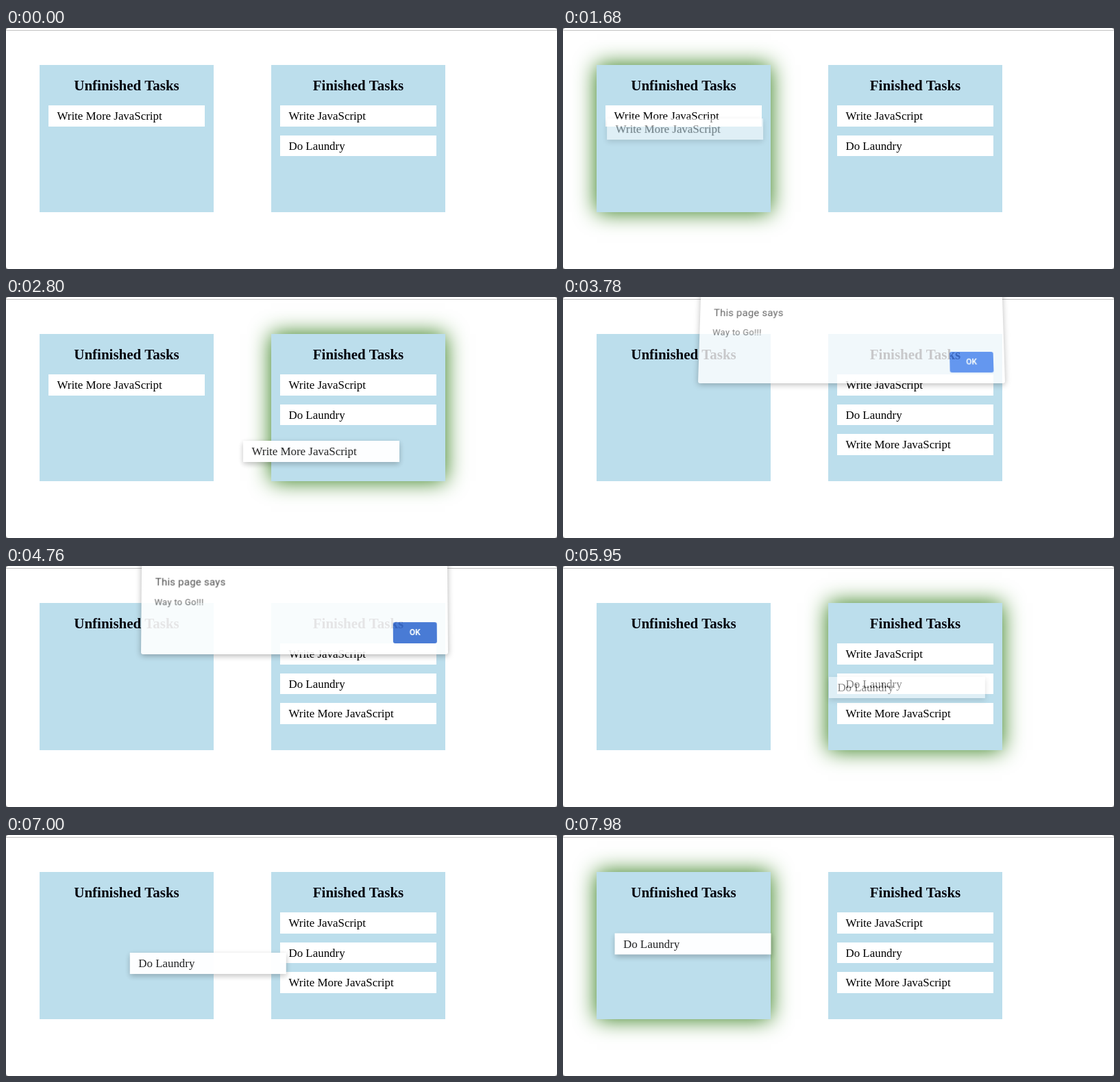
Animation, 804 px wide and 352 px high, one loop 8000 ms. Source, as an HTML page:

```html
<!DOCTYPE html>
<html lang="en">
<head>
<meta charset="utf-8">
<title>Task board</title>
<style>
  html, body { margin: 0; width: 100%; height: 100%; overflow: hidden; background: #8a8a8a; }
  .stage {
    position: relative; width: 804px; height: 352px; overflow: hidden;
    background: #fff; border-radius: 4px;
    font: 16.9px/32.5px "Liberation Serif", "Times New Roman", serif; color: #000;
  }
  .stage * { position: absolute; box-sizing: border-box; margin: 0; white-space: nowrap; }
  .rule { left: 0; top: 3px; width: 100%; height: 1px; background: #c3c3c3; }

  .list { top: 54px; width: 254px; height: 215px; background: #bcdeec; }
  .todo { left: 49px; }
  .done { left: 387px; }
  h2 { top: 18px; width: 100%; font-size: 21px; line-height: 24px; text-align: center; color: #02020c; }

  .task { left: 13px; width: 228px; height: 30.5px; padding-left: 12.5px; background: #fff; }
  .task span { position: static; }
  .row1 { top: 59px; }
  .row2 { top: 102.5px; }
  .row3 { top: 146px; }

  .glow { inset: 0; box-shadow: 0 0 30px rgb(42, 120, 16); opacity: 0; }
  .ghost { left: 0; top: 0; color: #1c1c1c; box-shadow: 0 3px 8px rgba(0, 0, 0, .25); opacity: 0; }

  .dialog {
    left: 197px; top: -14px; width: 448px; height: 144px; background: #fff;
    border-radius: 3px; box-shadow: 0 2px 8px rgba(0, 0, 0, .35);
    font-family: Roboto, sans-serif; transform-origin: 50% 100%; opacity: 0;
  }
  .says { left: 20px; top: 28px; font-size: 15px; line-height: 20px; letter-spacing: .25px; color: #3b3b3b; }
  .cheer { left: 19px; top: 58px; font-size: 13px; line-height: 20px; letter-spacing: .3px; color: #5c5c5c; }
  .ok {
    left: 368px; top: 97px; width: 64px; height: 31px; border-radius: 3px; background: #4a83f0;
    color: #fff; font-size: 12px; font-weight: 700; line-height: 31px; text-align: center;
  }

  /* one loop is 8 s, so 1% is 80 ms */
  .leave      { animation: leave 8s step-end infinite; }
  .arrive     { animation: arrive 8s step-end infinite; }
  .todo .glow { animation: todo-glow 8s step-end infinite; }
  .done .glow { animation: done-glow 8s step-end infinite; }
  .write      { animation: write-path 8s linear infinite, write-fade 8s linear infinite; }
  .wash       { animation: wash-path 8s linear infinite, wash-fade 8s linear infinite; }
  .dialog     { animation: dialog 8s linear infinite; }
  .ok         { animation: press 8s step-end infinite; }

  @keyframes leave  { 0% { opacity: 1; } 39.375%, 100% { opacity: 0; } }
  @keyframes arrive { 0% { opacity: 0; } 39.375%, 100% { opacity: 1; } }

  @keyframes todo-glow {
    0% { opacity: 0; } 19.25% { opacity: 1; } 29.75% { opacity: 0; }
    88.8%, 100% { opacity: 1; }
  }
  @keyframes done-glow {
    0% { opacity: 0; } 32.3% { opacity: 1; } 39.375% { opacity: 0; }
    72.625% { opacity: 1; } 84.8%, 100% { opacity: 0; }
  }

  @keyframes write-path {
    0%, 19.25% { transform: translate(62px, 113px); }
    21% { transform: translate(64px, 132px); }
    24.5% { transform: translate(82px, 163px); }
    29.75% { transform: translate(160px, 196px); }
    32.4% { transform: translate(244px, 208px); }
    35% { transform: translate(346px, 210px); }
    36.75%, 100% { transform: translate(353px, 209px); }
  }
  @keyframes write-fade {
    0%, 19.25% { opacity: 0; }
    21% { opacity: .53; }
    22.75%, 39.37% { opacity: .97; }
    39.375%, 100% { opacity: 0; }
  }
  @keyframes wash-path {
    0%, 72.625% { transform: translate(400px, 156.5px); }
    74.375% { transform: translate(388px, 162px); }
    78.75% { transform: translate(345px, 172px); }
    83.75% { transform: translate(262px, 177px); }
    87.5% { transform: translate(181px, 172px); }
    90.125% { transform: translate(131px, 162px); }
    94.5%, 96.25% { transform: translate(102px, 151px); }
    99.75%, 100% { transform: translate(75.5px, 143.5px); }
  }
  @keyframes wash-fade {
    0%, 72.625% { opacity: 0; }
    74.375% { opacity: .53; }
    76.125%, 100% { opacity: .97; }
  }

  @keyframes dialog {
    0%, 46.25% { opacity: 0; transform: translateY(-12px) perspective(1200px) rotateX(24deg); }
    47.25% { opacity: .78; transform: translateY(-4px) perspective(1200px) rotateX(10deg); }
    48.5%, 59.25% { opacity: 1; transform: translateY(0) perspective(1200px) rotateX(0deg); }
    60.5% { opacity: .5; transform: translateY(-5px) perspective(1200px) rotateX(12deg); }
    61.5%, 100% { opacity: 0; transform: translateY(-12px) perspective(1200px) rotateX(24deg); }
  }
  @keyframes press { 0% { background: #4a83f0; } 57.75%, 100% { background: #3b6fd3; } }
</style>
</head>
<body>
<div class="stage">
  <div class="rule"></div>
  <section class="list todo">
    <div class="glow"></div>
    <h2>Unfinished Tasks</h2>
    <div class="task row1 leave"><span>Write More JavaScript</span></div>
  </section>
  <section class="list done">
    <div class="glow"></div>
    <h2>Finished Tasks</h2>
    <div class="task row1"><span>Write JavaScript</span></div>
    <div class="task row2"><span>Do Laundry</span></div>
    <div class="task row3 arrive"><span>Write More JavaScript</span></div>
  </section>
  <div class="task ghost write"><span>Write More JavaScript</span></div>
  <div class="task ghost wash"><span>Do Laundry</span></div>
  <div class="dialog">
    <div class="says">This page says</div>
    <div class="cheer">Way to Go!!!</div>
    <div class="ok">OK</div>
  </div>
</div>
</body>
</html>
```
